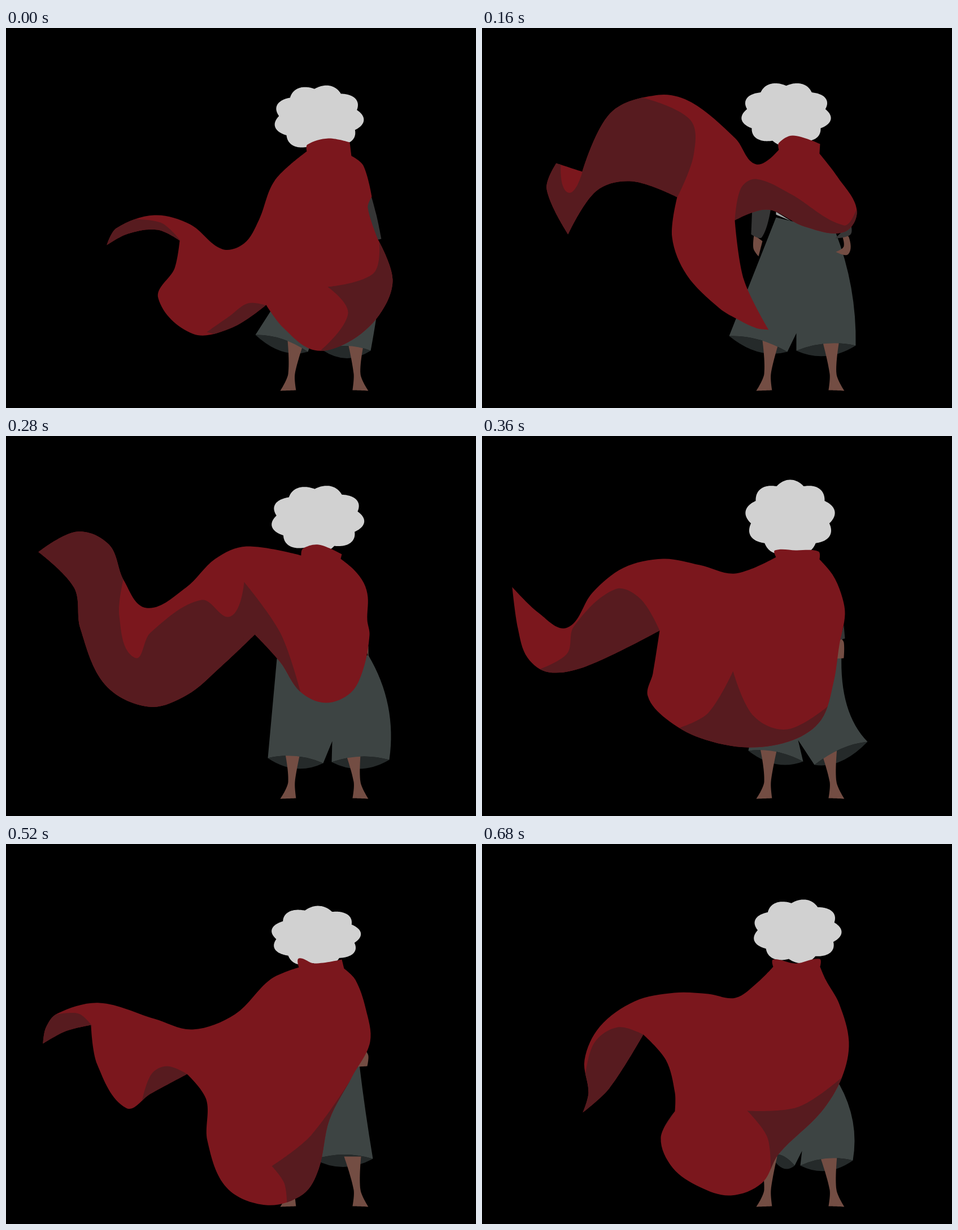
Write an HTML page with a canvas that moves like this. It is 832 px wide and 673 px high and loops after 760 ms.

```html
<!DOCTYPE html>
<html lang="en">
<head>
<meta charset="utf-8">
<title>Cape in the wind</title>
<style>
html, body { margin: 0; height: 100%; overflow: hidden; background: #000; }
canvas { display: block; }
</style>
</head>
<body>
<canvas id="stage" width="832" height="673"></canvas>
<script>
// Shapes are smooth closed curves through "x y" key points; * marks a corner.
// Pants run: waist, hem, inseam, crotch, inseam, hem, thigh control, waist.
// Hair is center x, center y, radius x, radius y, direction of one curl in degrees.
const poses = [
  {
    at: 0, lean: 6, hair: '553 159 80 59 -76',
    pants: '475 490,441 543,534 573,545 540,560 570,645 571,650 545,657 500',
    sleeveR: '641 279*,655 330,664 373*,655 375*,630 330',
    cape: '532 218*,475 270,447 340,421 381,382 391,325 347,262 331,195 354,178 384*,215 364,268 357,307 376*,298 425,269 478,330 541,400 530,460 490*,490 530,545 570,605 556,660 508,684 445,658 374*,640 318,647 298*,632 243,611 226*,608 202*,570 195,533 206',
    tail: '170 388*,172 365,222 338*,275 345,308 376*,240 395*',
    middle: '355 538*,395 510,428 487,461 491*,400 550*',
    hem: '569 458*,650 434,660 378*,760 480*,640 620*,555 572*,605 505'
  },
  {
    at: 80, lean: 6, hair: '541 151 79 58 -64',
    pants: '610 380,462 555,540 575,560 560,600 575,681 566,688 474,629 372',
    sleeveR: '645 325*,653 333,658 371*,633 377*',
    handR: '641 365*,655 372,655 404,634 402*,644 388',
    cape: '530 215*,480 209,412 226,350 297,340 370,345 423,291 455,302 526*,238 558*,243 567,290 568,326 555,375 512,415 496*,455 545,505 584,550 605,590 613,630 617,722 577,747 488*,690 567*,640 541,594 450,640 348,658 280,604 222*,596 205*,560 186,528 203',
    tail: '302 526*,270 470,317 440,365 449,415 496*,360 570*,326 558*',
    hem: '510 588*,600 608,690 567*,747 470*,760 600*,630 640*'
  },
  {
    at: 160, lean: 4, hair: '538 152 80 57 -70',
    pants: '520 335,437 545,540 573,556 540,556 571,661 562,663 458,625 360',
    sleeveL: '478 315*,511 318*,495 370,476 365*',
    handL: '481 366*,496 377*,489 404*,480 390',
    sleeveR: '652 345*,652 365,625 372*',
    handR: '635 362*,649 370,648 400,626 396*,640 386',
    belt: '520 325*,520 330*,546 341*',
    cape: '525 215*,485 241,448 195,370 131,312 118,227 150,177 254*,131 239*,114 285,152 365*,202 288,265 271,345 299*,336 370,362 437,420 496,455 517,485 531,507 534*,463 445,447 340*,505 321,570 351,640 361,663 322,628 262,597 222*,598 205*,550 190,525 203',
    tail: '345 300*,374 225,368 162,284 123*,220 110*,177 255*,152 291,139 240*,90 220*,150 390*,200 305,265 285*',
    hem: '447 342*,458 283,485 267,545 293,640 349,662 322*,690 380*,560 390*,500 330*'
  },
  {
    at: 280, lean: 0, hair: '551 146 83 60 -74',
    pants: '479 394,463 570,561 579,577 540,576 577,678 573,692 474,641 388',
    handR: '636 372*,641 372*,641 392*',
    cape: '522 211*,425 195,370 217,318 268,248 304,208 255,182 192,125 169,57 205*,120 268,131 340,175 440,252 479,320 458,380 408,440 351*,485 400,520 452,565 472,610 454,632 412,643 352,639 325,640 285,633 260,615 236,592 217*,594 209*,553 192,525 199',
    tail: '208 250*,200 318,227 392,255 348,345 290,397 319,421 258*,430 500*,60 500*,20 150*,212 150*',
    hem: '421 258*,485 348,521 453*,420 480*'
  },
  {
    at: 360, lean: 0, hair: '545 144 80 67 -90',
    pants: '490 450,471 557,568 576,559 538,588 582,682 541,632 490,636 385',
    sleeveR: '640 335*,642 358*,632 361*',
    handR: '634 357*,640 365,640 393*,624 394*',
    cape: '520 214*,448 243,385 228,320 217,250 233,195 277,150 339,100 313,53 267*,63 340,80 392,118 418,185 407,314 344*,302 420,293 460,325 500,385 534,470 551,550 538,600 502,622 435,632 370,642 315,635 278,620 245,597 218*,595 204,555 202,518 202',
    tail: '314 344*,280 288,235 271,162 337,150 385,100 413*,130 440*,250 420*',
    hem: '350 516*,400 490,444 416*,480 495,540 519,612 478*,600 580*,380 570*'
  },
  {
    at: 520, lean: 0, hair: '548 163 80 54 -86',
    pants: '540 400,500 545,525 555,530 550,545 558,649 557,635 473,625 390',
    handR: '636 365*,641 375,639 393*,622 394*',
    cape: '518 218*,468 239,405 301,330 328,262 309,165 281,90 300,70 325,65 353*,105 331,150 320*,161 390,212 467,255 442,320 407*,354 452,356 525,390 608,460 639,525 620,553 575,572 488,612 412,644 350,636 290,618 240,598 220*,594 204*,545 211,518 202',
    tail: '55 360*,62 310,86 302*,128 300,152 322*,110 350*',
    middle: '240 456*,257 407,285 393,322 408*,280 460*',
    hem: '470 570*,540 515,625 393*,640 450*,600 640*,497 641*,492 600'
  },
  {
    at: 680, lean: 0, hair: '557 154 79 57 -78',
    pants: '530 440,510 550,553 569,566 543,563 569,656 560,668 490,632 425',
    cape: '515 217*,487 245,448 272,400 265,340 263,270 278,208 323,181 382,188 440,178 475*,225 432,285 337*,325 382,341 440,341 473*,316 520,337 573,385 607,440 622,495 600,525 548,600 474,637 412,649 350,632 283,608 240,598 217*,597 203,555 211,515 204',
    tail: '285 337*,240 324,198 352,182 412*,160 490*,240 450*',
    middle: '341 473*,320 505*,300 480*,330 460*',
    hem: '469 472*,560 465,640 410*,660 440*,510 590*,505 520'
  }
];
const LEG = '485 642*,499 612,492 553*,522 553*,511 612,513 641*';
const LOOP = 760, CURLS = 9, CURL_DEPTH = .12;
const colors = {
  cuff: '#252a2a', skin: '#734d43', pants: '#3d4443', belt: '#a3a3a3',
  sleeve: '#363636', hair: '#d1d1d1', cape: '#7b171d', lining: '#571b1f'
};
const ctx = document.getElementById('stage').getContext('2d');
const mix = (a, b, k) => a + (b - a) * k;
const dist = (a, b) => Math.hypot(b.x - a.x, b.y - a.y);

const parse = text => text.split(',').map(item => {
  const [x, y] = item.match(/\d+/g).map(Number);
  return { x, y, smooth: item.endsWith('*') ? 0 : 1 };
});

// Shapes with unequal counts share points, so every key point finds a partner.
function morph(a, b, k) {
  const count = Math.max(a.length, b.length);
  const pick = (list, i) => list[Math.floor(i * list.length / count)];
  return Array.from({ length: count }, (_, i) => {
    const p = pick(a, i), q = pick(b, i);
    return { x: mix(p.x, q.x, k), y: mix(p.y, q.y, k), smooth: mix(p.smooth, q.smooth, k) };
  });
}

function fill(color) {
  ctx.fillStyle = color;
  ctx.fill();
}

function curve(points) {
  const n = points.length, at = i => points[(i + n) % n];
  const handle = (i, reach) => {
    const p = at(i), a = at(i - 1), b = at(i + 1);
    const s = p.smooth * reach / 3 / (dist(a, b) || 1);
    return [p.x + (b.x - a.x) * s, p.y + (b.y - a.y) * s];
  };
  ctx.beginPath();
  ctx.moveTo(points[0].x, points[0].y);
  for (let i = 0; i < n; i++) {
    const reach = dist(at(i), at(i + 1)), end = at(i + 1);
    ctx.bezierCurveTo(...handle(i, reach), ...handle(i + 1, -reach), end.x, end.y);
  }
}

function drawHair([cx, cy, rx, ry, turn]) {
  ctx.beginPath();
  for (let degree = 0; degree < 360; degree++) {
    const curl = Math.abs(Math.cos((degree - turn) * CURLS / 2 * Math.PI / 180));
    const r = 1 - CURL_DEPTH * (1 - curl), angle = degree * Math.PI / 180;
    ctx.lineTo(cx + rx * r * Math.cos(angle), cy + ry * r * Math.sin(angle));
  }
  fill(colors.hair);
}

function drawLegs(lean) {
  const bend = (p, amount) => amount * Math.max(0, 612 - p.y) / 59;
  const leg = parse(LEG);
  curve(leg.map(p => ({ ...p, x: p.x + bend(p, lean) })));
  fill(colors.skin);
  curve(leg.map(p => ({ ...p, x: 1126 - p.x + bend(p, lean - 6) })));
  fill(colors.skin);
}

function drawTrousers([waistL, hemL, inseamL, crotch, inseamR, hemR, thigh, waistR], lean) {
  const line = p => ctx.lineTo(p.x, p.y);
  const bow = (a, b, sag) => ctx.quadraticCurveTo((a.x + b.x) / 2, (a.y + b.y) / 2 + sag, b.x, b.y);
  for (const [a, b] of [[hemL, inseamL], [inseamR, hemR]]) {
    ctx.beginPath();
    line(a);
    bow(a, b, 28);
    bow(b, a, -16);
    fill(colors.cuff);
  }
  drawLegs(lean);
  ctx.beginPath();
  line(waistL);
  line(hemL);
  bow(hemL, inseamL, -16);
  line(crotch);
  line(inseamR);
  bow(inseamR, hemR, -16);
  ctx.quadraticCurveTo(thigh.x, thigh.y, waistR.x, waistR.y);
  fill(colors.pants);
}

function draw(time) {
  const index = poses.findLastIndex(pose => pose.at <= time);
  const a = poses[index], b = poses[index + 1] || a;
  const k = a === b ? 0 : (time - a.at) / (b.at - a.at);
  const shape = part => morph(parse(a[part]), parse((k ? b : a)[part]), k);
  const paint = (part, color) => {
    if (!a[part] || k && !b[part]) return;
    curve(shape(part));
    fill(color);
  };
  ctx.setTransform(1, 0, 0, 1, 0, 0);
  ctx.fillStyle = '#000';
  ctx.fillRect(0, 0, 832, 673);
  ctx.translate(.5, .5);
  drawTrousers(shape('pants'), mix(a.lean, b.lean, k));
  paint('belt', colors.belt);
  for (const side of 'LR') {
    paint('hand' + side, colors.skin);
    paint('sleeve' + side, colors.sleeve);
  }
  const target = b.hair.split(' ');
  drawHair(a.hair.split(' ').map((value, i) => mix(+value, +target[i], k)));
  paint('cape', colors.cape);
  ctx.save();
  ctx.clip();
  for (const part of ['tail', 'middle', 'hem']) paint(part, colors.lining);
  ctx.restore();
}

// The picture is held for 40 ms at a time, and for 80 ms from 280 ms on.
function tick() {
  const time = performance.now() % LOOP;
  const hold = time < 280 ? 40 : 80;
  draw(280 + Math.floor((time - 280) / hold) * hold);
  requestAnimationFrame(tick);
}
tick();
</script>
</body>
</html>
```
